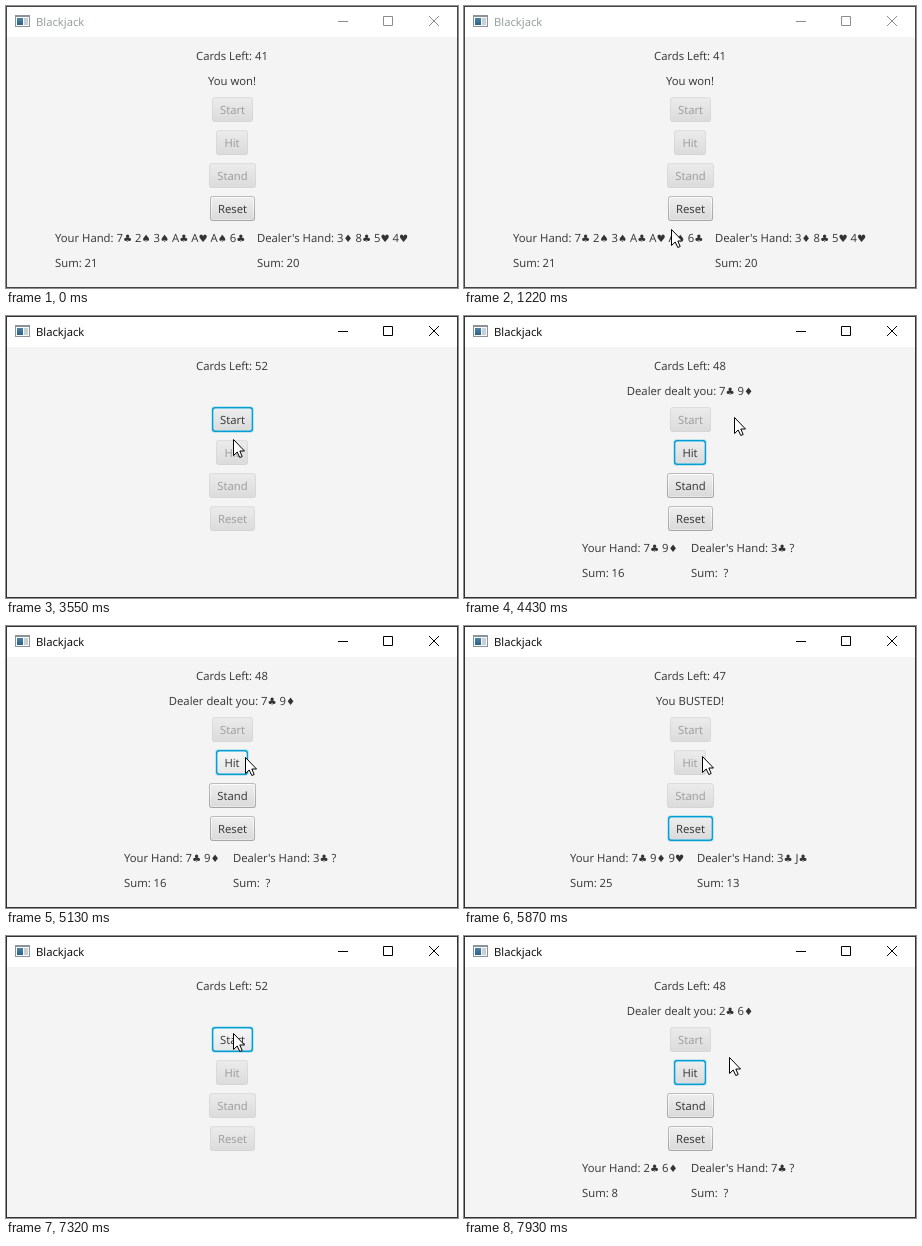
These frames come from a looping animation (452 by 282 pixels, 8 s). An HTML page with a canvas:

```html
<!DOCTYPE html>
<html lang="en">
<head>
<meta charset="utf-8">
<title>Blackjack</title>
<style>
  html, body { margin: 0; width: 100%; height: 100%; overflow: hidden; background: #f4f4f4; }
  canvas { display: block; }
</style>
</head>
<body>
<canvas id="stage" width="452" height="282"></canvas>
<script>
const ctx = document.getElementById('stage').getContext('2d');
ctx.textRendering = 'geometricPrecision';

const LOOP = 8000, STEP = 70, ACTIVATED = 2910;
const TEXT_FONT = '11.3px "Open Sans", "Noto Sans", sans-serif';
const SUIT_FONT = '10.2px "DejaVu Sans", sans-serif';

const BUTTONS = [
  { name: 'Start', x: 206, y: 91, w: 41 },
  { name: 'Hit', x: 210, y: 124, w: 32 },
  { name: 'Stand', x: 203, y: 157, w: 47 },
  { name: 'Reset', x: 204, y: 190, w: 45 },
];
const BUTTON_HEIGHT = 25;

// Each hand: left edge, cards, sum.
const dealt = (time, mine, sum, dealer) => ({
  time, left: 48, message: 'Dealer dealt you: ' + mine,
  enabled: ['Hit', 'Stand', 'Reset'], focus: 'Hit',
  hands: [[118, mine, sum], [227, dealer + ' ?', ' ?']],
});
const cleared = time => ({
  time, left: 52, message: '', enabled: ['Start'], focus: 'Start', hands: [],
});
const finished = (time, left, message, ...hands) => ({
  time, left, message, enabled: ['Reset'], focus: 'Reset', hands,
});
const STATES = [
  finished(0, 41, 'You won!', [49, '7♣ 2♠ 3♠ A♣ A♥ A♠ 6♣', 21], [251, '3♦ 8♣ 5♥ 4♥', 20]),
  cleared(2980),
  dealt(3820, '7♣ 9♦', 16, '3♣'),
  finished(5340, 47, 'You BUSTED!', [106, '7♣ 9♦ 9♥', 25], [233, '3♣ J♣', 13]),
  cleared(6770),
  dealt(7460, '2♣ 6♦', 8, '7♣'),
];
// Every change of state follows a short mouse press.
const isPressed = t => STATES.some(s => s.time > 0 && t >= s.time - STEP && t < s.time);

// Pointer path: time, x, y.
const PATH = [
  [330, 397, 253], [600, 382, 150], [750, 350, 94], [1080, 296, 173],
  [1220, 207, 223], [1500, 147, 243], [2020, 147, 243], [2510, 226, 205],
  [3130, 226, 205], [3680, 227, 98], [4150, 227, 98], [4430, 270, 101],
  [4600, 275, 123], [4780, 258, 143], [4990, 240, 132], [5270, 238, 130],
  [5870, 238, 130], [6150, 278, 165], [6500, 238, 202], [6900, 238, 202],
  [7320, 227, 97], [7650, 227, 97], [7930, 265, 121],
];

const lastBefore = (list, t, timeOf) => list.findLastIndex(item => timeOf(item) <= t);

function pointerAt(t) {
  const i = lastBefore(PATH, t, key => key[0]);
  if (i < 0) return null;
  const [t0, x0, y0] = PATH[i];
  const [t1, x1, y1] = PATH[i + 1] || [LOOP, x0, y0];
  const k = Math.floor((t - t0) / STEP) * STEP / (t1 - t0);
  return { x: Math.round(x0 + (x1 - x0) * k), y: Math.round(y0 + (y1 - y0) * k) };
}

// Text whose card suits use their own font.
function drawText(text, x, y, centered = false, color = '#333') {
  const runs = text.split(/([♠♣♥♦])/).filter(Boolean).map(run => {
    ctx.font = /[♠♣♥♦]/.test(run) ? SUIT_FONT : TEXT_FONT;
    return { run, font: ctx.font, width: ctx.measureText(run).width };
  });
  if (centered) x -= runs.reduce((sum, r) => sum + r.width, 0) / 2;
  ctx.fillStyle = color;
  for (const { run, font, width } of runs) {
    ctx.font = font;
    ctx.fillText(run, x, y);
    x += width;
  }
}

function roundBox(x, y, w, h, r, fill) {
  ctx.beginPath();
  ctx.roundRect(x, y, w, h, r);
  ctx.fillStyle = fill;
  ctx.fill();
}

function vertical(y, h, top, bottom) {
  const g = ctx.createLinearGradient(0, y, 0, y + h);
  g.addColorStop(0, top);
  g.addColorStop(1, bottom);
  return g;
}

function drawButton({ name, x, y, w }, { enabled, focused, hovered, pressed }) {
  const h = BUTTON_HEIGHT;
  const [top, bottom] = pressed ? ['#dcdcdc', '#cacaca']
    : hovered ? ['#f7f7f7', '#e6e6e6'] : ['#efefef', '#d9d9d9'];
  ctx.globalAlpha = enabled ? 1 : 0.4;
  if (focused) roundBox(x - 1, y - 1, w + 2, h + 2, 4, 'rgba(3,158,211,.2)');
  roundBox(x, y, w, h, 3, focused ? '#039ed3' : vertical(y, h, '#bcbcbc', '#a6a6a6'));
  const edge = focused ? 1.4 : 1;
  roundBox(x + edge, y + edge, w - 2 * edge, h - 2 * edge, 2, vertical(y, h, '#fdfdfd', '#e6e6e6'));
  roundBox(x + 2, y + 2, w - 4, h - 4, 1, vertical(y, h, top, bottom));
  drawText(name, x + w / 2, y + 17, true);
  ctx.globalAlpha = 1;
}

function drawWindow(active) {
  ctx.fillStyle = '#f4f4f4';
  ctx.fillRect(0, 0, 452, 282);
  ctx.fillStyle = '#fff';
  ctx.fillRect(0, 0, 452, 31);

  // Title icon
  ctx.fillStyle = '#8b9299';
  ctx.fillRect(9, 9, 15, 12);
  ctx.fillStyle = '#f6f8f9';
  ctx.fillRect(10, 11, 13, 9);
  ctx.fillStyle = vertical(11, 8, '#4f87ad', '#2d6384');
  ctx.fillRect(11, 12, 6, 7);
  ctx.fillStyle = '#c9d0d4';
  ctx.fillRect(18, 12, 4, 7);

  drawText('Blackjack', 30, 20, false, active ? '#000' : '#929a98');
  ctx.lineWidth = 1;
  ctx.strokeStyle = active ? '#000' : '#8c8c8c';
  ctx.beginPath();
  ctx.moveTo(332, 15.5); ctx.lineTo(342, 15.5);
  ctx.rect(377.5, 10.5, 9, 9);
  ctx.moveTo(423, 10); ctx.lineTo(433, 20);
  ctx.moveTo(433, 10); ctx.lineTo(423, 20);
  ctx.stroke();

  ctx.strokeStyle = active ? '#333' : '#454545';
  ctx.strokeRect(0.5, 0.5, 451, 281);
}

const ARROW = new Path2D('M.5 .5V16.5L4.2 13L6.8 18.5L9.2 17.5L6.8 12H11.5Z');

function drawPointer({ x, y }, pressed) {
  if (pressed) {
    ctx.beginPath();
    ctx.arc(x - 0.5, y + 0.5, 12, 0, 2 * Math.PI);
    ctx.fillStyle = 'rgba(255,240,0,.6)';
    ctx.fill();
  }
  ctx.save();
  ctx.translate(x, y);
  ctx.fillStyle = '#fff';
  ctx.strokeStyle = '#000';
  ctx.fill(ARROW);
  ctx.stroke(ARROW);
  ctx.restore();
}

function draw(t) {
  const state = STATES[lastBefore(STATES, t, s => s.time)];
  const pointer = pointerAt(t);
  const pressed = isPressed(t);
  const active = t >= ACTIVATED;

  drawWindow(active);
  drawText('Cards Left: ' + state.left, 226, 54, true);
  drawText(state.message, 226, 79, true);
  for (const button of BUTTONS) {
    const { name, x, y, w } = button;
    const enabled = state.enabled.includes(name);
    const hovered = enabled && pointer && pointer.x >= x && pointer.x < x + w
      && pointer.y >= y && pointer.y < y + BUTTON_HEIGHT;
    drawButton(button, {
      enabled, hovered, pressed: hovered && pressed,
      focused: active && state.focus === name,
    });
  }
  state.hands.forEach(([x, cards, sum], i) => {
    drawText(['Your Hand: ', "Dealer's Hand: "][i] + cards, x, 236);
    drawText('Sum: ' + sum, x, 261);
  });
  if (pointer) drawPointer(pointer, pressed);
}

const start = performance.now();
function tick() {
  draw((performance.now() - start) % LOOP);
  requestAnimationFrame(tick);
}
tick();
</script>
</body>
</html>
```
